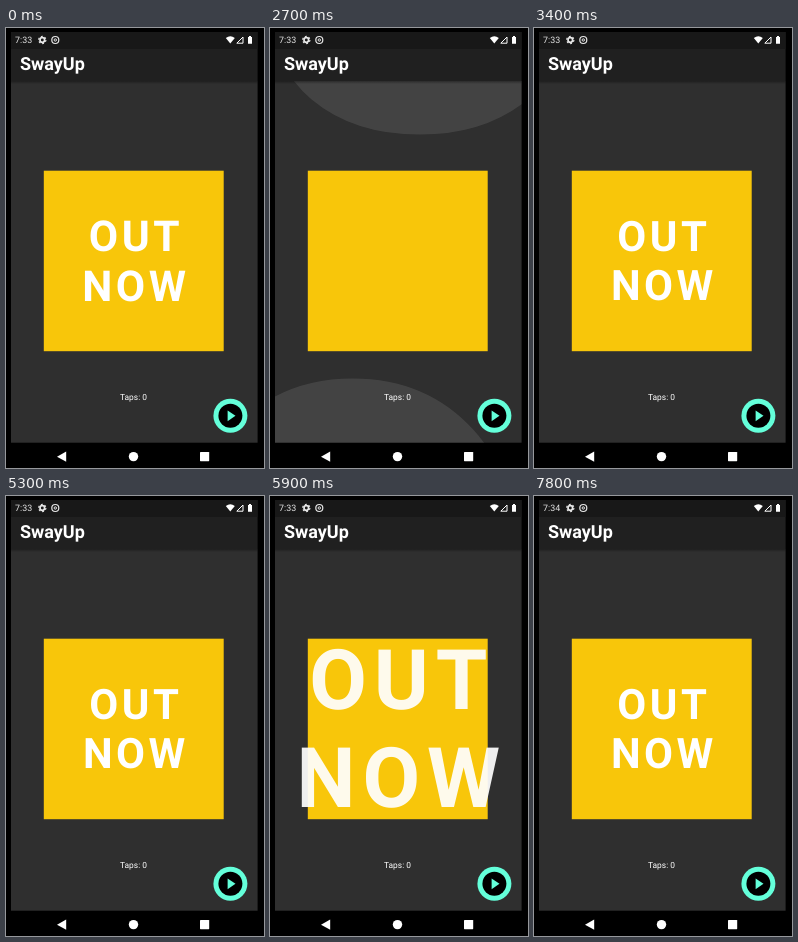
An HTML page that plays this animation: 258x440 px, repeating every 8000 ms.

```html
<!DOCTYPE html>
<html lang="en">
<head>
<meta charset="utf-8">
<title>Text zoom</title>
<style>
  html, body { margin: 0; width: 100%; height: 100%; overflow: hidden; background: #000; }
  svg { display: block; width: 258px; height: 440px; }
  text { font-family: Roboto, Arial, sans-serif; fill: #fff; text-rendering: geometricPrecision; }
  #headline { font-size: 42px; font-weight: 700; letter-spacing: 3.5px; text-anchor: middle; }
</style>
</head>
<body>
<svg viewBox="0 0 258 440">
  <defs>
    <clipPath id="body"><rect x="5" y="53" width="246.6" height="361.7"/></clipPath>
    <linearGradient id="shade" x2="0" y2="1">
      <stop stop-color="#000" stop-opacity=".35"/>
      <stop offset="1" stop-color="#000" stop-opacity="0"/>
    </linearGradient>
  </defs>

  <rect width="258" height="440"/>
  <rect x="5" y="53" width="246.6" height="361.7" fill="#2f2f2f"/>
  <rect x="37.8" y="142.7" width="179.9" height="180.5" fill="#f8c60a"/>
  <text x="127.5" y="371.7" font-size="8.4" text-anchor="middle">Taps: 0</text>

  <g clip-path="url(#body)">
    <g id="headline">
      <text x="129.9" y="223">OUT</text>
      <text x="129.9" y="272.2">NOW</text>
    </g>
  </g>

  <!-- app bar and status bar -->
  <rect x="5" y="53" width="246.6" height="3" fill="url(#shade)"/>
  <rect x="5" y="4" width="246.6" height="49" fill="#202020"/>
  <rect x="5" y="4" width="246.6" height="17" fill="#181818"/>
  <text x="14" y="42" font-size="18" font-weight="700">SwayUp</text>
  <text id="clock" x="9" y="15.2" font-size="8.9" style="fill:#e8e8e8">7:33</text>
  <g fill="none" stroke="#e8e8e8">
    <circle cx="36.3" cy="12" r="2.3" stroke-width="1.7"/>
    <circle cx="36.3" cy="12" r="3.6" stroke-width="1.2" stroke-dasharray="1.9 1.87"/>
    <circle cx="49.3" cy="12" r="3.5" stroke-width="1.2"/>
    <circle cx="49.3" cy="12" r="1.2" stroke-width="1"/>
  </g>
  <g fill="#fff">
    <path d="M219.8 10Q224.3 6.6 228.8 10L224.3 15.6Z"/>
    <path d="M237 9V15.2H230.8Z" fill="none" stroke="#fff"/>
    <path d="M242 9h1V8h2v1h1v6.8h-4Z"/>
  </g>

  <!-- floating button -->
  <circle cx="224.4" cy="387.8" r="17" fill="#64ffda"/>
  <circle cx="224.4" cy="387.8" r="12"/>
  <path d="M221.6 382.4V393.2L229.5 387.8Z" fill="#64ffda"/>

  <!-- navigation bar -->
  <g fill="#fff">
    <path d="M51 428.7L60.2 423.6V433.8Z"/>
    <circle cx="127.5" cy="428.6" r="4.7"/>
    <rect x="194" y="424" width="9.2" height="9.2" rx=".6"/>
  </g>
</svg>
<script>
  const LOOP = 8000;
  const CENTER = { x: 128, y: 233 };
  const EXTRA_SCALE = 13.5;
  // hide: text vanishes; start: zoom begins; rate: settling speed per ms
  const RUNS = [
    { hide: -500, start: -470, rate: 0.0194 },
    { hide: 2500, start: 2674, rate: 0.0194 },
    { hide: 5600, start: 5577, rate: 0.0132 }
  ];
  const headline = document.getElementById('headline');
  const clock = document.getElementById('clock');

  // Critically damped fall from 1 to 0
  function remaining(t) {
    const run = RUNS.filter(r => t >= r.hide).pop();
    const u = Math.max(0, t - run.start) * run.rate;
    return (1 + u) * Math.exp(-u);
  }

  function render(t) {
    const rest = remaining(t);
    const { x, y } = CENTER;
    headline.setAttribute('transform',
      `translate(${x} ${y}) scale(${1 + EXTRA_SCALE * rest}) translate(${-x} ${-y})`);
    headline.setAttribute('opacity', 1 - rest);
    clock.textContent = t < 7800 ? '7:33' : '7:34';
  }

  const began = performance.now();
  function tick() {
    render((performance.now() - began) % LOOP);
    requestAnimationFrame(tick);
  }
  tick();
</script>
</body>
</html>
```
